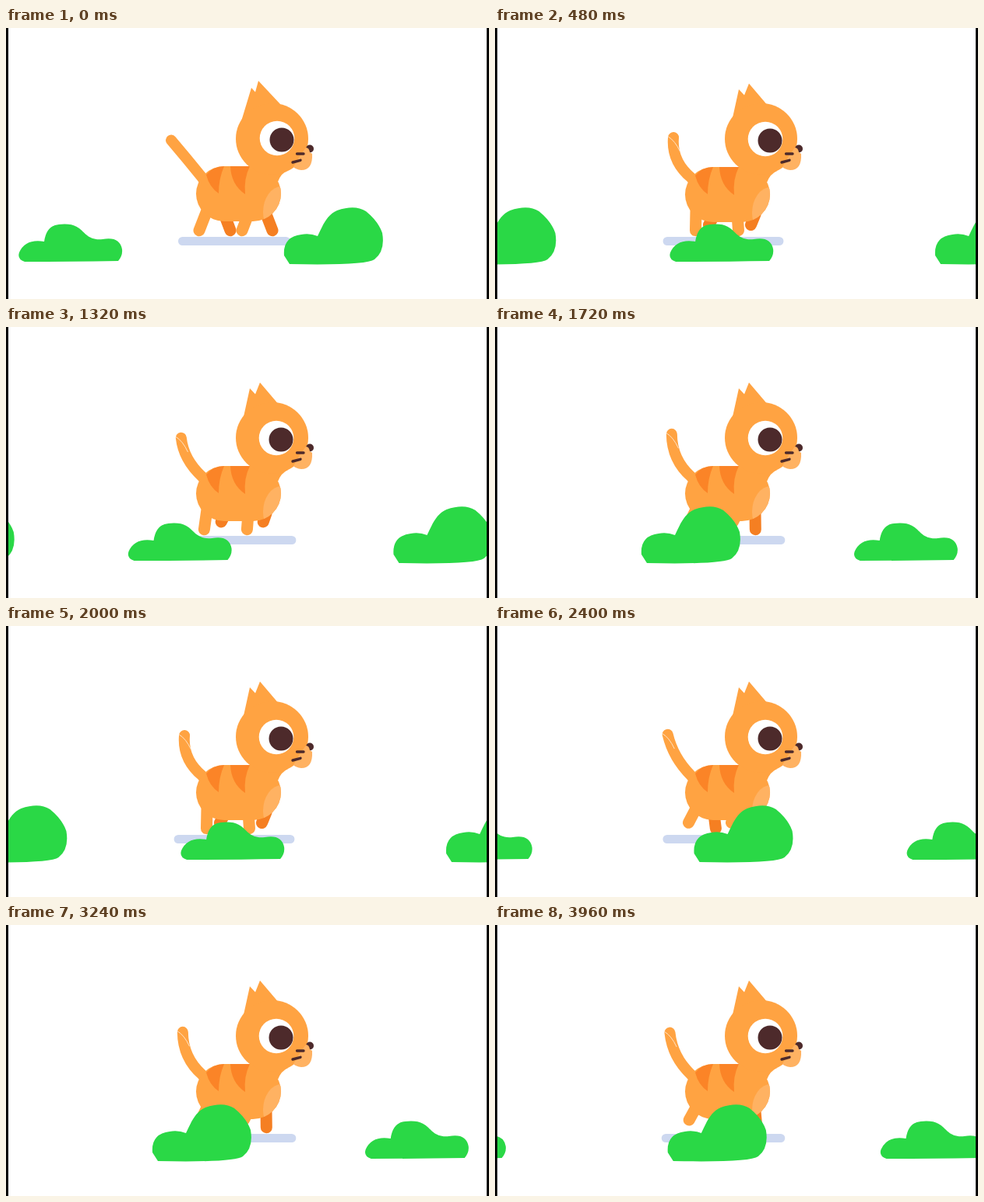
Write an HTML page that moves like this. It is 620 by 349 pixels and loops after 4 s.

```html
<!DOCTYPE html>
<html lang="en">
<head>
<meta charset="utf-8">
<title>Walking cat</title>
<style>
  html, body { margin: 0; width: 100%; height: 100%; overflow: hidden; background: #fff; }
  svg { display: block; width: 100vw; height: 100vh; }
  .fur { fill: #ffa342; }
  .stripe { fill: #fb8427; }
  .pale { fill: #ffb262; }
  .ink { fill: #4d2a2b; }
  .line { fill: none; stroke-linecap: round; }
  .leg { stroke-width: 15; stroke: #ffa342; }
  .far { stroke: #f57f22; }
</style>
</head>
<body>
<svg viewBox="0 0 620 349">
  <defs>
    <clipPath id="torso"><rect x="244" y="179" width="109" height="71" rx="36"/></clipPath>
    <g id="bushes" fill="#2ad846">
      <path d="M24 301Q14 298 17 289Q25 271 49 275Q52 254 68 253Q85 251 94 258C101 263 106 274 124 272Q146 268 149 285Q150 293 144 300Q80 301 24 301Z"/>
      <path d="M364 304L357 293Q355 269 379 266Q390 264 400 268C406 256 411 241 425 235Q448 227 462 236Q478 249 483 264Q487 287 473 298Q462 306 364 304Z"/>
    </g>
  </defs>
  <path id="shadow" class="line" stroke="#cdd8f0" stroke-width="11"/>
  <path id="farBack" class="line leg far"/>
  <path id="farFront" class="line leg far"/>
  <path id="tail" class="line" stroke="#ffa342" stroke-width="14"/>
  <path id="seam" class="line" stroke="#ffe3c4" stroke-width="1"/>
  <path id="nearBack" class="line leg"/>
  <path id="nearFront" class="line leg"/>
  <g id="body">
    <rect class="fur" x="244" y="179" width="109" height="71" rx="36"/>
    <path class="fur" d="M305 179H362V184Q353 188 349 199L340 216H305Z"/>
    <ellipse class="pale" cx="354" cy="238" rx="24" ry="33" clip-path="url(#torso)"/>
    <path class="stripe" d="M257 190Q266 179 280 179Q273 195 273 214Q261 206 257 190Z"/>
    <path class="stripe" d="M288 179H313Q305 195 307 215Q289 203 288 179Z"/>
  </g>
  <path id="ears" class="fur"/>
  <ellipse class="fur" cx="341.5" cy="142.7" rx="46.5" ry="46"/>
  <g id="eye">
    <circle cx="347" cy="143" r="22.3" fill="#fff"/>
    <circle class="ink" cx="353" cy="145" r="15.5"/>
  </g>
  <circle class="ink" cx="390" cy="155.5" r="5"/>
  <path class="pale" d="M385 154Q389 154 390 160L393 162Q394 183 379 183Q372 182 369 179Q375 167 385 154Z"/>
  <path class="line" stroke="#4d2a2b" stroke-width="3.4" d="M373.5 162H382M368 173L378 170.3"/>
  <use id="bushA" href="#bushes"/>
  <use id="bushB" href="#bushes"/>
  <path d="M0 0H3V349H0ZM617 0H620V349H617Z"/>
</svg>
<script>
  const LOOP = 4000, STEP = 40, REPEAT = 760, STRIDE = 726, SPAN = 613.7;
  const part = id => document.getElementById(id);
  const set = (id, name, value) => part(id).setAttribute(name, value);
  const draw = (id, d) => set(id, 'd', d);
  const move = (id, x, y) => set(id, 'transform', `translate(${x} ${y})`);

  // First half of a stride pushes the foot back, second half lifts it forward.
  function leg(id, hipX, hipY, footX, cycle) {
    const q = cycle % 1, u = Math.max(0, q * 2 - 1);
    const reach = q < .5 ? 14 * (1 - 2 * q) : 14 * u ** 3;
    const lift = 10 * Math.sin(Math.PI * u) ** 2;
    draw(id, `M${hipX} ${hipY}L${footX + reach} ${260.7 - lift}`);
  }

  function render(time) {
    const phase = Math.floor(time % LOOP / STEP) * STEP % REPEAT;
    const q = phase / STRIDE, swing = Math.sin(Math.PI * q);

    const half = 66.5 + 7.5 * Math.sin(2 * Math.PI * q) ** 2;
    draw('shadow', `M${293 - half} 274.5H${293 + half}`);

    leg('farBack', 281, 242, 274, q);
    leg('farFront', 334, 240, 328, q);
    leg('nearBack', 258, 235, 248, q + .5);
    leg('nearFront', 311, 240, 303, q + .5);

    const tipX = 212 + 19.5 * swing;
    const tipY = 144.5 - 6 * (swing + .35 * Math.sin(2 * Math.PI * q));
    draw('tail', `M255 197L252 193Q${232 - 6.5 * swing} ${168 + 4 * swing} ${tipX} ${tipY}`);
    draw('seam', `M${tipX - 6.5} ${tipY - 1}Q${tipX + 2} ${tipY + 4} ${tipX + 8.5} ${tipY + 18}`);
    set('seam', 'opacity', Math.min(1, swing * 2));

    // Ears perk up at the start of each stride.
    const perk = Math.max(0, 1 - phase / 100, (phase - 640) / 200);
    const mix = (a, b) => a + (b - a) * perk;
    draw('ears', `M${mix(304, 302)} 120L${mix(313, 315)} ${mix(79, 77)}L320 ${mix(86.5, 82.5)}` +
      `L${mix(326, 324)} ${mix(71.5, 68)}L${mix(348.5, 352)} 98L342 142Z`);
    move('eye', perk, -perk);
    move('body', 0, -perk);

    const scroll = -phase * .845;
    move('bushA', scroll, 0);
    move('bushB', scroll + SPAN, 0);
  }

  const start = performance.now();
  function tick() {
    render(performance.now() - start);
    requestAnimationFrame(tick);
  }
  tick();
</script>
</body>
</html>
```
